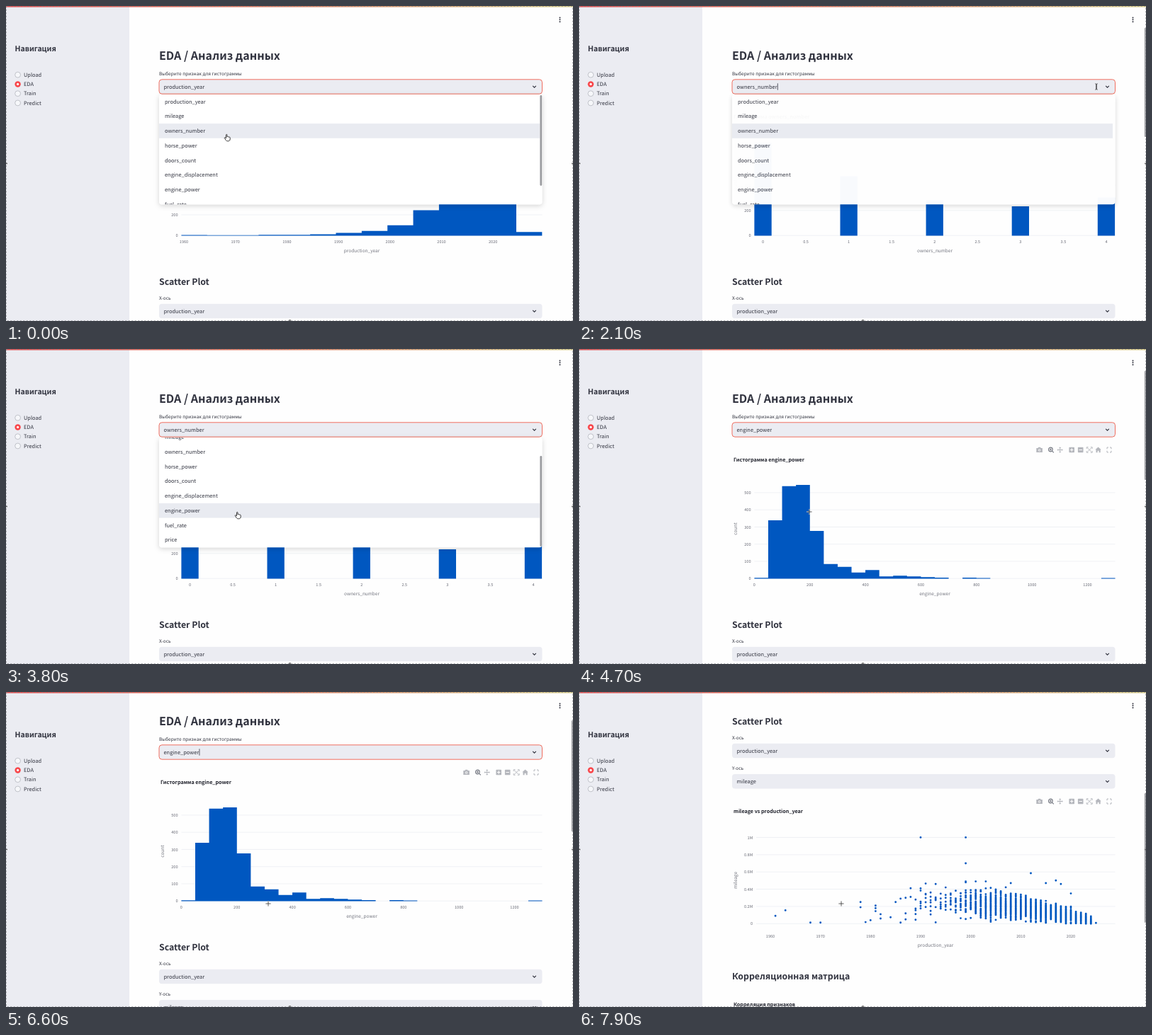
Recreate the animation shown at these times as an HTML page. Size 800x445 px, loop 8000 ms.

```html
<!DOCTYPE html>
<html lang="ru">
<head>
<meta charset="utf-8">
<title>EDA</title>
<style>
html, body { margin: 0; width: 100%; height: 100%; overflow: hidden; background: #fefefe; }
svg { display: block; width: 100vw; height: 100vh; }
text {
  font-family: "Noto Sans CJK JP", "Noto Sans CJK SC", "Noto Sans CJK KR", "Noto Sans", sans-serif;
  fill: #31333f; text-rendering: geometricPrecision; white-space: pre;
}
.body { font-size: 7.43px; }
.label { font-size: 6.5px; }
.tick { font-size: 5.6px; fill: #6a6c77; }
.axis { font-size: 6.5px; fill: #73757f; }
.plot { font-size: 7.2px; font-weight: 700; fill: #20222c; }
.h1 { font-size: 16px; font-weight: 700; }
.h2 { font-size: 10.5px; font-weight: 700; }
.h3 { font-size: 12.3px; font-weight: 700; }
.grid { stroke: #e4e7ee; stroke-width: .6; }
.bars { fill: #0057c0; }
.dots { stroke: #0057c0; stroke-width: 2.9; stroke-linecap: round; }
</style>
</head>
<body>
<svg id="stage" viewBox="0 0 800 445" preserveAspectRatio="none"></svg>
<script>
const LOOP = 8000, FRAME = 100, ROW = 20.75, LIST_TOP = 124.6;
const INK = '#31333f', PANEL = '#ebecf2';
const stage = document.getElementById('stage');

// ---------- markup helpers ----------
const text = (x, y, s, cls, anchor = 'start', extra = '') =>
  `<text x="${x}" y="${y}" class="${cls}" text-anchor="${anchor}" ${extra}>${s}</text>`;
const rect = (x, y, w, h, fill, extra = '') =>
  `<rect x="${x}" y="${y}" width="${w}" height="${h}" fill="${fill}" ${extra}/>`;
const gridLine = (x, y) => `<path class="grid" d="M${x} ${y}H756.5"/>`;
const upright = (s, y) =>
  text(0, 0, s, 'axis', 'middle', `transform="translate(223.3 ${y}) rotate(-90)"`);
const chevron = y =>
  `<path d="M743.2 ${y - 1.2}l2.3 2.4l2.3-2.4" fill="none" stroke="${INK}" stroke-width="1.2"/>`;
const select = (y, value, id = '') =>
  rect(216, y - 10.2, 540.5, 20.4, PANEL, `rx="4" ${id && `id="${id}Box"`}`) +
  text(222.5, y + 2.6, value, 'body', 'start', id && `id="${id}"`) + chevron(y);

// ---------- plot toolbar ----------
const toolbar = (id, y) => `<g id="${id}" transform="translate(0 ${y})" fill="#b5b7bd" stroke="none">
  <path d="M645.3-2.5h2l1-1.2h2.6l1 1.2h2v6h-8.6z"/><circle cx="649.6" cy=".4" r="1.7" fill="#fff"/>
  <circle cx="649.6" cy=".4" r=".9"/>
  <g fill="none" stroke="#777a84" stroke-width="1.2"><circle cx="665.4" cy="-.5" r="2.8"/>
  <path d="M667.5 1.6l2.3 2.3M664-.5h2.8M665.4-1.9v2.8"/></g>
  <path d="M678.7-4.2l1.6 1.7h-1.1v2h2v-1.1l1.7 1.6l-1.7 1.6v-1.1h-2v2h1.1l-1.6 1.7l-1.6-1.7h1.1v-2h-2v1.1l-1.7-1.6l1.7-1.6v1.1h2v-2h-1.1z"/>
  <rect x="691.4" y="-3.7" width="7.6" height="7.4" rx=".8"/><rect x="703.9" y="-3.7" width="7.6" height="7.4" rx=".8"/>
  <path d="M693 0h4.4M695.2-2.2v4.4M705.5 0h4.4" stroke="#fff" stroke-width="1.1"/>
  <path d="M717-3l6.4 6M723.4-3l-6.4 6M716.2-1.5v-2.3h2.4M721.8-3.8h2.4v2.3M716.2 1.5v2.3h2.4M721.8 3.8h2.4v-2.3" fill="none" stroke="#b5b7bd" stroke-width=".9"/>
  <path d="M732.6-4l4.2 3.8h-1.1v3.9h-2.1v-2.5h-2v2.5h-2.1v-3.9h-1.1z"/>
  <path d="M745-1.2v-2.3h2M749-3.5h2v2.3M745 1.2v2.3h2M749 3.5h2v-2.3" fill="none" stroke="#b5b7bd" stroke-width="1"/>
</g>`;

// ---------- histograms ----------
function histogram(name, { dx, w, heights, gap, step, ticks, t0, dt }) {
  let s = text(218, 158.5, 'Гистограмма ' + name, 'plot');
  for (let k = 0; k * gap < 135; k++) {
    s += gridLine(247.4, 324.2 - k * gap) + text(242.6, 326.3 - k * gap, k * step, 'tick', 'end');
  }
  const bars = heights.map((h, i) => h ? `M${247.4 + i * dx} 324.4v${-h}h${w}v${h}z` : '').join('');
  s += `<path class="bars" d="${bars}"/>`;
  ticks.forEach((v, i) => s += text(t0 + i * dt, 335.2, v, 'tick', 'middle'));
  return s + text(502, 347.8, name, 'axis', 'middle') + upright('count', 254);
}
const range = (n, f) => Array.from({ length: n }, (_, i) => f(i));
const charts = {
  production_year: {
    dx: 36.35, w: 36.4, gap: 29.2, step: 200, t0: 251, dt: 72.7, ticks: range(7, i => 1960 + i * 10),
    heights: [.9, .7, .7, 1.1, 1.2, 1.8, 4, 6.7, 14.6, 35.8, 80, 131, 112, 5.2]
  },
  owners_number: {
    dx: 121.1, w: 24.3, gap: 35.4, step: 200, t0: 259.5, dt: 60.57, ticks: range(9, i => i / 2),
    heights: [131, 84, 50, 41.4, 54]
  },
  engine_power: {
    dx: 19.58, w: 19.65, gap: 24.25, step: 100, t0: 247.4, dt: 78.35, ticks: range(7, i => i * 200),
    heights: [1.2, 82.4, 130.6, 132.5, 67.4, 20.6, 16.6, 8.6, 12.2, 3.2, 4.2, 3.2, 2.2, 1.5, 0, 1.5, .9,
      0, 0, 0, 0, 0, 0, 0, 0, .9]
  }
};

// ---------- scatter ----------
let seed = 11;
const rnd = () => (seed = seed * 16807 % 2147483647) / 2147483647;
const bell = () => (rnd() + rnd() + rnd() - 1.5) / 1.5;

function scatter() {
  const pts = [[61, .09], [63, .155], [68, .012], [70, .012], [78, .25], [78, .19], [79, .018], [80, .04],
    [81, .21], [81, .18], [81, .145], [82, .11], [82, .06], [84, .075], [85, .25], [86, .29], [86, .012],
    [87, .3], [87, .12], [87, .05], [88, .41], [88, .31], [90, 1], [99, 1], [99, .7], [112, .585],
    [117, .5], [91, .465], [93, .46], [99, .49], [101, .49], [103, .49], [108, .47], [115, .47], [118, .46],
    [120, .35], [125, .008]];
  for (let y = 89; y < 125; y++) {
    const age = Math.max(0, (y - 103) / 21);
    const n = y < 97 ? 5 + (y - 89) * .5 : Math.min(90, 12 + (y - 97) * 7) * (y > 121 ? .4 : 1);
    const mid = .235 - .2 * age ** 1.3, spread = .24 - .15 * age;
    for (let i = 0; i < n; i++) {
      const v = Math.abs(mid + spread * bell() * (rnd() < .05 ? 1.6 : .95));
      pts.push([y, Math.min(v, .49)]);
    }
  }
  const d = pts.map(([y, v]) =>
    `M${(270 + (y - 60) * 7.067).toFixed(1)} ${(675.3 - v * 121.9).toFixed(1)}h0`).join('');
  let s = text(218, 518.5, 'mileage vs production_year', 'plot');
  ['0', '0.2M', '0.4M', '0.6M', '0.8M', '1M'].forEach((v, k) => {
    const y = 675.3 - k * 24.37;
    s += gridLine(250, y) + text(245.2, y + 2.1, v, 'tick', 'end');
  });
  range(7, i => s += text(270 + i * 70.67, 695.2, 1960 + i * 10, 'tick', 'middle'));
  return s + `<path class="dots" d="${d}"/>` +
    text(503, 707.6, 'production_year', 'axis', 'middle') + upright('mileage', 614);
}

// ---------- page ----------
const options = ['production_year', 'mileage', 'owners_number', 'horse_power', 'doors_count',
  'engine_displacement', 'engine_power', 'fuel_rate', 'price'];

const page = `<g id="page">
  ${text(216, 76, 'EDA / Анализ данных', 'h1')}
  ${text(216, 98, 'Выберите признак для гистограммы', 'label')}
  ${select(114, '', 'feature')}
  <path id="caret" d="M0 109.3v9.4" stroke="${INK}" stroke-width=".8"/>
  ${Object.keys(charts).map(k => `<g id="${k}">${histogram(k, charts[k])}</g>`).join('')}
  ${toolbar('histBar', 142.5)}
  ${text(216, 393.8, 'Scatter Plot', 'h3')}
  ${text(216, 414.6, 'X-ось', 'label')}${select(431, 'production_year')}
  ${text(216, 458, 'Y-ось', 'label')}${select(474.3, 'mileage')}
  ${scatter()}
  ${toolbar('scatterBar', 502.5)}
  ${text(216, 753.8, 'Корреляционная матрица', 'h3')}
  ${text(218, 791.5, 'Корреляция признаков', 'plot')}
</g>`;

const dropdown = `<g id="menu">
  ${rect(216, 125, 540.5, 155.2, '#fff', 'rx="4" filter="url(#shadow)"')}
  <g clip-path="url(#menuClip)"><g id="rows">
    ${rect(216, 0, 537, 20.7, '#e9ebf1', 'id="hover"')}
    ${options.map((o, i) => text(224, 137.6 + i * ROW, o, 'body')).join('')}
  </g></g>
  ${rect(753.4, 126, 2.8, 128, '#9b9ca0', 'rx="1.4" id="menuThumb"')}
</g>`;

const sidebar = rect(0, 0, 174, 445, PANEL) + text(12.5, 64, 'Навигация', 'h2') +
  ['Upload', 'EDA', 'Train', 'Predict'].map((s, i) => {
    const y = 97.2 + i * 13.25;
    const mark = i === 1
      ? `<circle cx="16.6" cy="${y}" r="4.2" fill="#f8464a"/><circle cx="16.6" cy="${y}" r="1.6" fill="#fff"/>`
      : `<circle cx="16.6" cy="${y}" r="3.9" fill="#f6f7fa" stroke="#b3b5bd" stroke-width=".8"/>`;
    return mark + text(25, y + 2.7, s, 'body');
  }).join('');

const cursors = `<g id="cursor">
  <path id="hand" d="M-1.5-3.8c0-1.1 1.5-1.1 1.5 0v2.6c.4-.6 1.4-.5 1.5.2c.5-.5 1.3-.2 1.4.4c.6-.4 1.3 0 1.3.7v1.8c0 1.6-.9 2.9-2.4 2.9h-1.3c-1.3 0-1.9-.7-2.6-1.8l-1.5-2.3c-.5-.8.5-1.5 1.1-.8l1 1z" fill="#fff" stroke="#222" stroke-width=".9"/>
  <path id="beam" d="M-1.7-4.2q1.7 0 1.7 1v6.4q0 1-1.7 1M1.7-4.2q-1.7 0-1.7 1v6.4q0 1 1.7 1" fill="none" stroke="#222" stroke-width=".8"/>
  <g id="cross" fill="none"><path d="M-4 0h8M0-4v8" stroke="#fff" stroke-opacity=".6" stroke-width="1.8"/>
  <path d="M-3.6 0h7.2M0-3.6v7.2" stroke="#333" stroke-width=".8"/></g>
</g>`;

stage.innerHTML = `<defs>
  <linearGradient id="strip"><stop stop-color="#e5484a"/><stop offset=".5" stop-color="#dd7a5c"/><stop offset="1" stop-color="#ddd189"/></linearGradient>
  <filter id="shadow" x="-5%" y="-10%" width="110%" height="125%"><feDropShadow dx="0" dy="2" stdDeviation="3.5" flood-opacity=".17"/></filter>
  <clipPath id="menuClip"><rect x="216" y="125" width="540.5" height="155.2" rx="4"/></clipPath>
</defs>
${rect(0, 0, 800, 445, '#fefefe')}${page}
${rect(174, 0, 626, 31, '#fefefe')}${sidebar}
${rect(0, 0, 800, 1.6, 'url(#strip)')}
${[16.4, 19.3, 22.2].map(y => `<circle cx="781.5" cy="${y}" r="1" fill="${INK}"/>`).join('')}
${rect(797.8, 31, 2.2, 154, '#a3a4a8', 'rx="1.1" id="thumb"')}
${dropdown}
<rect x=".5" y=".5" width="799" height="444" fill="none" stroke="#85868c" stroke-opacity=".75" stroke-width=".8" stroke-dasharray="2.5 2"/>
<path d="M0 222.5h2M798 222.5h2M399 444h3" stroke="#666" stroke-width="1.6"/>
${cursors}`;

// ---------- timeline ----------
const el = {};
stage.querySelectorAll('[id]').forEach(n => el[n.id] = n);
const set = (id, attr, v) => el[id].setAttribute(attr, v);
const show = (id, on) => set(id, 'opacity', +on);

const clamp = v => Math.max(0, Math.min(1, v));
const ramp = (t, a, b) => clamp((t - a) / (b - a));
const smooth = u => u * u * (3 - 2 * u);

// keys: [time, value, value...]
function track(keys, t, ease = u => u) {
  let i = 0;
  while (i < keys.length - 2 && t >= keys[i + 1][0]) i++;
  const [a, b] = [keys[i], keys[i + 1]];
  const u = ease(ramp(t, a[0], b[0]));
  return a.slice(1).map((v, k) => v + (b[k + 1] - v) * u);
}

const pointer = [[0, 312, 186], [1000, 312, 186], [1800, 730, 114], [2200, 730, 114], [2700, 340, 195],
  [3000, 340, 195], [3700, 327, 235], [4000, 327, 235], [4600, 325, 230], [5000, 325, 230],
  [5300, 336, 247], [5600, 336, 247], [6400, 370, 299], [8000, 370, 299]];
const scrolling = [[6400, 0], [6500, 8], [6600, 29], [6700, 95], [6800, 180], [6900, 250], [7000, 301],
  [7100, 320], [7200, 331], [7400, 342], [7600, 346.5], [7900, 348]];

function draw(t) {
  const [cx, cy] = track(pointer, t, smooth);
  const [scroll] = track(scrolling, t);
  const chart = t < 500 ? 'production_year' : t < 4400 ? 'owners_number' : 'engine_power';
  const value = t < 200 ? 'production_year' : t < 4100 ? 'owners_number' : 'engine_power';

  set('page', 'transform', `translate(0 ${-scroll})`);
  Object.keys(charts).forEach(k => el[k].style.display = k === chart ? '' : 'none');

  el.feature.textContent = value;
  set('featureBox', 'stroke', '#f0604f');
  set('featureBox', 'stroke-width', .9);
  set('caret', 'transform', `translate(${223.3 + el.feature.getComputedTextLength()} 0)`);
  show('caret', t >= 2000 && (t - 2000) % 1060 < 530);

  const open = t < 2000 ? 1 - ramp(t, 0, 300) * (t >= 100)
    : t < 4000 ? ramp(t, 2000, 2103) : 1 - ramp(t, 3900, 4200);
  const listScroll = t < 2000 ? 0 : 31.2 * smooth(ramp(t, 3000, 3600));
  const inside = cy > 125 && cy < 280;
  const row = inside ? Math.floor((cy - LIST_TOP + listScroll) / ROW) : 2;
  show('menu', 0);
  set('menu', 'opacity', open);
  set('rows', 'transform', `translate(0 ${-listScroll})`);
  set('hover', 'y', LIST_TOP + row * ROW);
  set('menuThumb', 'y', 126 + listScroll * .8);
  show('menuThumb', t < 1000 || t >= 2600);

  set('histBar', 'opacity', t < 2000 ? ramp(t, 200, 500) * (1 - ramp(t, 1700, 2000)) : ramp(t, 4200, 4500));
  set('scatterBar', 'opacity', ramp(t, 6960, 7250));

  set('thumb', 'y', 31 + scroll * .322);
  set('thumb', 'height', 154 + 29 * clamp(scroll / 300));
  set('thumb', 'opacity', t < 3000 ? (t >= 500) * (1 - ramp(t, 2200, 2500)) : +(t >= 4400));

  const kind = open > .5 && inside ? 'hand' : cy < 125 ? 'beam' : 'cross';
  ['hand', 'beam', 'cross'].forEach(k => show(k, k === kind));
  set('cursor', 'transform', `translate(${cx} ${cy})`);
}

const start = performance.now();
function tick() {
  const t = (performance.now() - start) % LOOP;
  draw(Math.floor(t / FRAME) * FRAME);
  requestAnimationFrame(tick);
}
tick();
</script>
</body>
</html>
```
